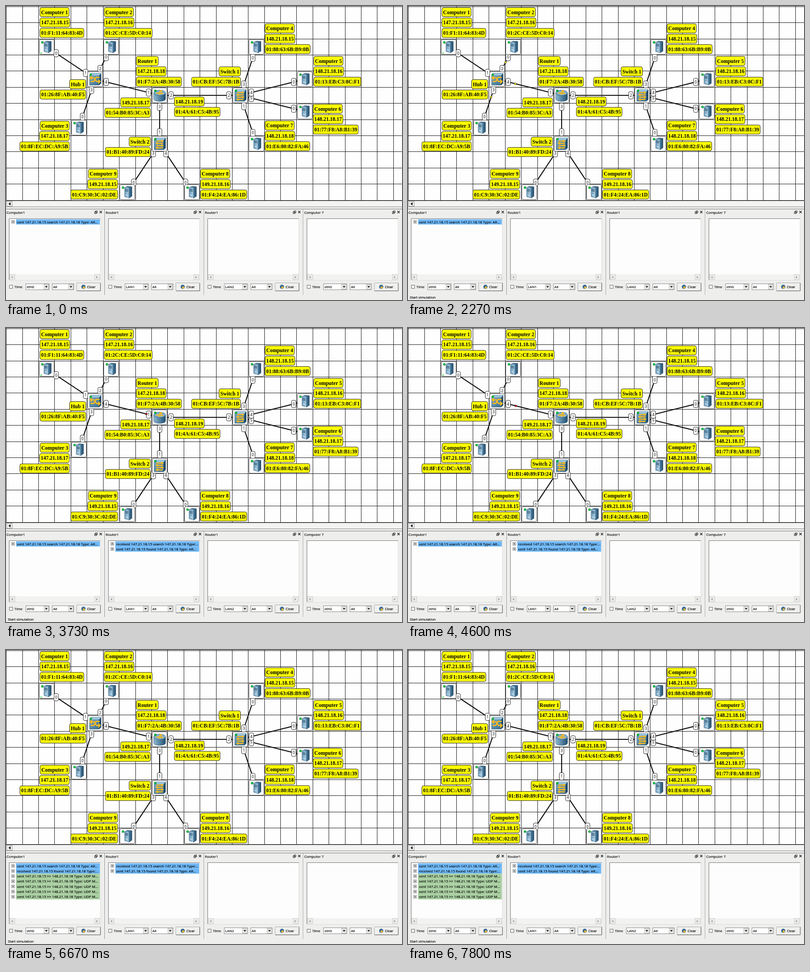
An HTML page for the animation above (8 s loop, 869 by 645 pixels).

```html
<!DOCTYPE html>
<html lang="en">
<head>
<meta charset="utf-8">
<title>Network simulation</title>
<style>
  html, body { margin: 0; width: 100%; height: 100%; overflow: hidden; background: #eeeeed; }
  svg { display: block; width: 100%; height: 100%; }
  text { font-family: "Open Sans", "Noto Sans", sans-serif; font-size: 7.7px; fill: #000; white-space: pre; }
  .panel text, .row text, #status text { stroke: #000; stroke-width: .18px; }
  .tag text { font: bold 11.5px "Liberation Serif", serif; text-anchor: middle; }
  .tag rect { fill: #ff0; stroke: #222; }
  .port text { font-size: 8.5px; text-anchor: middle; }
  .port rect { fill: #fff; stroke: #222; }
  .row text { font-size: 7.8px; }
</style>
</head>
<body>
<svg id="stage" viewBox="0 0 869 645" preserveAspectRatio="none">
  <defs>
    <linearGradient id="steel" x2="1"><stop stop-color="#8fbad4"/><stop offset="1" stop-color="#1f4f72"/></linearGradient>
    <linearGradient id="front" x2="1"><stop stop-color="#6b99b8"/><stop offset="1" stop-color="#a9cbe0"/></linearGradient>
    <linearGradient id="face" x2="1" y2="1"><stop stop-color="#7fafcd"/><stop offset="1" stop-color="#34688a"/></linearGradient>
    <clipPath id="view"><rect width="869" height="427"/></clipPath>
  </defs>
</svg>
<script>
const LOOP = 8000, TICK = 200 / 3, CELL = 35.4, LEFT = 0.8, TOP = 1.3;
const stage = document.getElementById("stage");

const rect = (x, y, w, h, fill, stroke = "none", rx = 0) =>
  `<rect x="${x}" y="${y}" width="${w}" height="${h}" fill="${fill}" stroke="${stroke}" rx="${rx}"/>`;
const path = (d, stroke, width = 1, fill = "none") =>
  `<path d="${d}" stroke="${stroke}" stroke-width="${width}" fill="${fill}"/>`;
const text = (x, y, s) => `<text x="${x}" y="${y}">${s.replace(/>/g, "&gt;")}</text>`;

// Devices sit in the middle of grid cells: [kind, column, row]
const nodes = {
  c1: ["pc", 2, 2], c2: ["pc", 6, 2], c3: ["pc", 4, 7], c4: ["pc", 15, 2], c5: ["pc", 18, 4],
  c6: ["pc", 18, 6], c7: ["pc", 15, 8], c8: ["pc", 11, 11], c9: ["pc", 7, 11],
  hub: ["hub", 5, 4], router: ["router", 9, 5], sw1: ["switch", 14, 5], sw2: ["switch", 9, 8]
};
const centre = id => {
  const [, col, row] = nodes[id];
  return [(col + 0.5) * CELL + LEFT, (row + 0.5) * CELL + TOP];
};

// [from, port, to, port]; drawn back to front
const links = [
  ["c1", 0, "hub", 1], ["hub", 2, "c2", 0], ["hub", 3, "c3", 0], ["hub", 4, "router", 1],
  ["router", 2, "sw1", 2], ["router", 3, "sw2", 1], ["sw1", 3, "c4", 0], ["sw1", 5, "c6", 0],
  ["sw1", 4, "c5", 0], ["sw1", 1, "c7", 0], ["sw2", 3, "c9", 0], ["sw2", 4, "c8", 0]
];

// [x, first line centre, right aligned, lines]
const tags = [
  [74.5, 13.5, 0, "Computer 1|147.21.18.15|01:F1:11:64:83:4D"],
  [215.5, 13.5, 0, "Computer 2|147.21.18.16|01:2C:CE:5D:C0:14"],
  [139, 262.5, 1, "Computer 3|147.21.18.17|01:8F:EC:DC:A9:5B"],
  [568.5, 49, 0, "Computer 4|148.21.18.15|01:88:63:6B:B9:0B"],
  [675.5, 120.5, 0, "Computer 5|148.21.18.16|01:13:EB:C3:8C:F1"],
  [674, 225.5, 0, "Computer 6|148.21.18.17|01:77:F8:A8:B1:39"],
  [568.5, 262, 0, "Computer 7|148.21.18.18|01:E6:80:82:FA:46"],
  [427, 368, 0, "Computer 8|149.21.18.16|01:F4:24:EA:86:1D"],
  [245, 368, 1, "Computer 9|149.21.18.15|01:C9:30:3C:02:DE"],
  [175, 171.5, 1, "Hub 1|01:26:8F:AB:40:F5"],
  [286, 120.5, 0, "Router 1|147.21.18.18|01:F7:2A:4B:30:58"],
  [317, 211.5, 1, "149.21.18.17|01:54:B0:85:3C:A3"],
  [369.5, 209.5, 0, "148.21.18.19|01:4A:61:C5:4B:95"],
  [514.5, 143.5, 1, "Switch 1|01:CB:EF:5C:7B:1B"],
  [317, 297.5, 1, "Switch 2|01:B1:40:89:FD:24"]
];

const box = path("M-12-8L-8-13H13V9L9 13H-12Z", "#274c63", 0.7, "url(#face)") +
  path("M9 13V-8L13-13V9Z", "none", 0, "#1f4a68") + path("M-12-8L-8-13H13L9-8Z", "none", 0, "#9cc4dc");
const gold = d => path(d, "#f5b920", 2.6);
const art = {
  pc: path("M-6-10L0-13L10-12V9L4 13L-6 10Z", "#345", 0.7, "url(#steel)") +
    path("M-6-10L3-9V13L-6 10Z", "none", 0, "url(#front)") +
    path("M-5-6L2-5M-5-3L2-2", "#264a63", 1.2) + path("M-4 6L1 7", "#e7f2f8", 1.3),
  hub: box + gold("M-10-3H-2L3 5H10M-10 5H-3L2-4H10") + gold("M-7-7L-11-3L-7 1M7 1L11 5L7 9"),
  switch: box + gold("M-7-6H7M-7-1H7M-7 4H7M-7 9H7") + gold("M4-8L7-6L4-4M-4-3L-7-1L-4 1M4 2L7 4L4 6M-4 7L-7 9L-4 11"),
  router: path("M-13-5V8C-13 15 13 15 13 8V-5Z", "#274c63", 0.7, "url(#steel)") +
    `<ellipse cy="-5.5" rx="13" ry="6" fill="#7fb0ce" stroke="#274c63" stroke-width=".7"/>` +
    gold("M-8-5H-2L2-9M8-4H2L-2-2") + gold("M0-10H4V-6")
};

function drawNode(id) {
  const [x, y] = centre(id);
  const mark = id === "c1" ? path("M-14 13.5H-10", "#2c3", 1.6) : "";
  return `<g transform="translate(${x} ${y})">` + rect(-16.3, -16.5, 32.6, 33, "#fff", "#444", 3) +
    art[nodes[id][0]] + `<circle cx="-9.5" cy="-10" r="2.4" fill="#1c3" stroke="#064" stroke-width=".7"/>${mark}</g>`;
}

// Point on the line between two devices, d pixels from the first
function along(a, b, d) {
  const [x1, y1] = centre(a), [x2, y2] = centre(b);
  const len = Math.hypot(x2 - x1, y2 - y1);
  return { x: x1 + (x2 - x1) * d / len, y: y1 + (y2 - y1) * d / len, len };
}

function drawPort(a, b, n) {
  const { x, y } = along(a, b, 25);
  return `<g class="port"><rect x="${x - 5}" y="${y - 8}" width="10" height="16" rx="3"/>${text(x, y + 3, "" + n)}</g>`;
}

const ruler = document.createElement("canvas").getContext("2d");
ruler.font = 'bold 11.5px "Liberation Serif", serif';

function drawTag([x, y, right, lines]) {
  return lines.split("|").map((s, i) => {
    const w = ruler.measureText(s).width + 5, left = right ? x - w : x, cy = y + 22.8 * i;
    return `<g class="tag"><rect x="${left}" y="${cy - 10}" width="${w}" height="20" rx="3.5"/>${text(left + w / 2, cy + 4, s)}</g>`;
  }).join("");
}

function drawGrid() {
  const snap = p => Math.floor(p) + 0.5;
  let d = "";
  for (let i = 0; i < 25; i++) {
    d += `M${snap(i * CELL + LEFT)} 0V427`;
    if (i < 13) d += `M0 ${snap(i * CELL + TOP)}H869`;
  }
  return path(d, "#1a1a1a");
}

function drawCombo(x, w, s) {
  return rect(x, 609.5, w, 13, "#fff", "#888") + rect(x + w - 11, 610.5, 10, 11, "#e8e8e6", "#bbb") +
    path(`M${x + w - 9} 614.5h6l-3 3.5z`, "none", 0, "#111") + text(x + 2, 618.8, s);
}

function drawPanel(title, port, i) {
  const arrows = path("M15 592.5V597.5L11.5 595ZM198 592.5V597.5L201.5 595Z", "none", 0, "#999");
  return `<g class="panel" transform="translate(${217.8 * i} 0)">` +
    path("M216.5 446V634", "#888") + path("M217.5 446V634", "#fff") +
    text(1, 455.8, title) +
    path("M196.5 449.5H200.5V453.5H196.5ZM194.5 451.5H198.5V455.5H194.5Z", "#222", 1, "#eeeeed") +
    path("M205.5 449.5L210.5 454.5M210.5 449.5L205.5 454.5", "#222", 1.3) +
    rect(7, 466.5, 200, 135, "#fdfdfd", "#ddd") + path("M7 601V466.5H207", "#777") +
    rect(8, 588.5, 198, 12, "#f2f2f0") + rect(8.5, 589, 11, 11, "#ececea", "#ccc") +
    rect(194.5, 589, 11, 11, "#ececea", "#ccc") + arrows +
    rect(7.5, 612.5, 7, 7, "#fff", "#666") + text(18.5, 618.8, "Time") +
    drawCombo(43.5, 51, port) + drawCombo(101.5, 47, "All") +
    rect(155, 607.5, 52, 17, "#f0f0ee", "#aaa", 1) + path("M155 625H207.5V607.5", "#666") +
    `<circle cx="170" cy="616" r="4.6" fill="#35688f"/><circle cx="171" cy="617.5" r="2.5" fill="#e6b83c"/>` +
    text(178, 618.8, "Clear") + "</g>";
}

const ip = "147.21.18.15", gate = "147.21.18.18";
const udp = `sent ${ip} >> 148.21.18.18 Type: UDP M...`;
// [panel, line, appears at, text]
const log = [
  [0, 0, 0, `sent ${ip} search ${gate} Type: AR...`],
  [1, 0, 3400, `received ${ip} search ${gate} Type:...`],
  [1, 1, 3400, `sent ${ip} found ${gate} Type: AR...`],
  [0, 1, 6470, `received ${ip} found ${gate} Type:...`],
  ...[2, 3, 4, 5, 6].map(n => [0, n, 6470, udp])
];

function drawRow([panel, line, , s]) {
  const y = 468 + 11.3 * line;
  return `<g class="row" transform="translate(${217.8 * panel} ${y})">` +
    rect(22, 0, 184, 11.4, s === udp ? "#a9cfa1" : "#6fb8f7") +
    rect(12.5, 2.5, 6, 6, "#fff", "#777") + path("M14 5.5H17M15.5 4V7", "#111") + text(24, 8.6, s) + "</g>";
}

// [from, to, departure, pixels per ms, colour]
const yellow = "#ff0", red = "#e01010";
const hops = [
  ["c1", "hub", 687, 0.103, yellow],
  ...["c2", "c3", "router"].map(to => ["hub", to, 1784, 0.0855, yellow]),
  ["router", "hub", 3384, 0.0855, red],
  ...["c1", "c2", "c3"].map(to => ["hub", to, 5135, 0.105, red]),
  ["c1", "hub", 6520, 0.103, red]
];

stage.innerHTML += rect(0, 0, 869, 645, "#eeeeed") +
  `<g clip-path="url(#view)">` + rect(0, 0, 869, 427, "#fefefe") + drawGrid() +
  links.map(([a, , b]) => path(`M${centre(a)}L${centre(b)}`, "#111", 2.2)).join("") +
  links.map(([a, m, b, n]) => drawPort(a, b, m) + drawPort(b, a, n)).join("") +
  hops.map(h => `<circle class="dot" r="2.1" fill="${h[4]}" stroke="#222" stroke-width=".8"/>`).join("") +
  Object.keys(nodes).map(drawNode).join("") + tags.map(drawTag).join("") + "</g>" +
  rect(0, 427, 869, 14, "#f4f4f3") + path("M0 427.5H869M0 440.5H869", "#888") +
  rect(1.5, 428.5, 12, 11, "#eeeeed", "#999") + path("M10 430.5V437.5L5.5 434Z", "none", 0, "#111") +
  path("M0 445.5H869", "#777") +
  [["Computer1", "eth0"], ["Router1", "LAN1"], ["Router1", "LAN2"], ["Computer 7", "eth0"]]
    .map(([title, port], i) => drawPanel(title, port, i)).join("") +
  log.map(drawRow).join("") +
  `<g id="status">${text(4, 641.8, "Start simulation")}</g>`;

const dots = stage.querySelectorAll(".dot"), rows = stage.querySelectorAll(".row");
const hint = stage.querySelector("#status");
const show = (el, on) => el.setAttribute("visibility", on ? "visible" : "hidden");

function render(t) {
  const now = Math.floor((t + 5) / TICK) * TICK;
  hops.forEach(([a, b, start, speed], i) => {
    const d = (now - start) * speed, p = along(a, b, d);
    show(dots[i], d > 0 && d < p.len);
    dots[i].setAttribute("cx", p.x);
    dots[i].setAttribute("cy", p.y);
  });
  log.forEach((entry, i) => show(rows[i], t >= entry[2]));
  show(hint, t >= 70);
}

const begin = performance.now();
function loop() {
  render((performance.now() - begin) % LOOP);
  requestAnimationFrame(loop);
}
loop();
</script>
</body>
</html>
```
